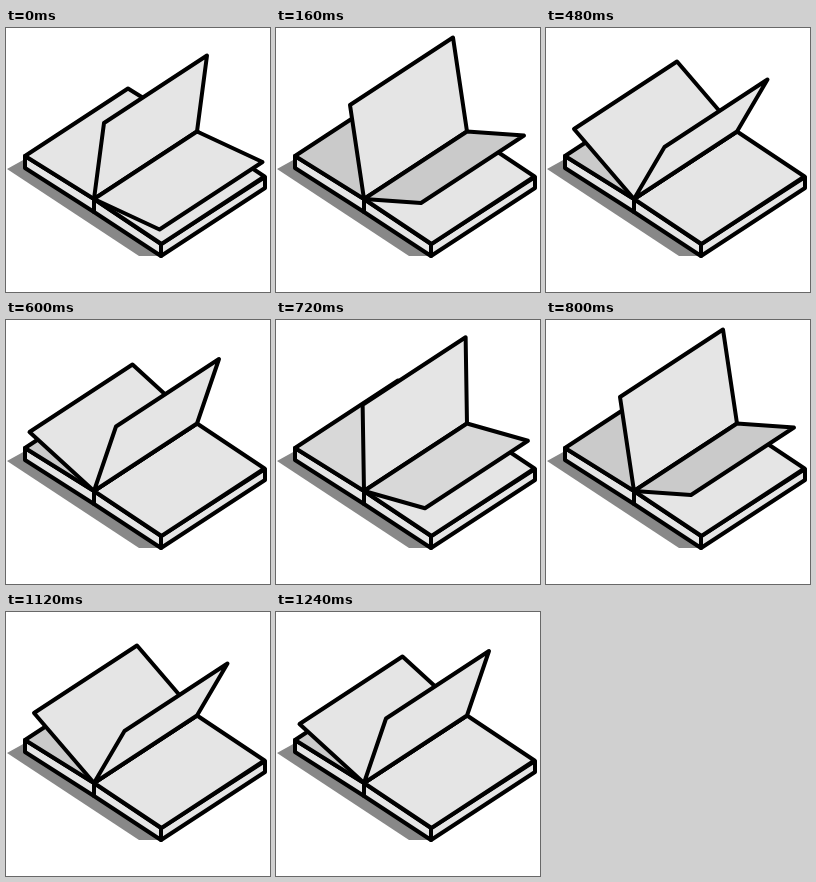
Write an HTML page with a canvas that moves like this. It is 264x264 px and loops after 1280 ms.

```html
<!DOCTYPE html>
<html lang="en">
<head>
<meta charset="utf-8">
<title>Turning pages</title>
<style>
  html, body { margin: 0; height: 100%; overflow: hidden; background: #fff; }
  canvas { display: block; width: 264px; height: 264px; }
</style>
</head>
<body>
<canvas id="stage" width="264" height="264"></canvas>
<script>
const ctx = document.getElementById('stage').getContext('2d');
const STEP = 40, STEPS = 16;
const LIGHT = 229, DARK = 202;
const spine = [88, 171], depth = [103, -67.5];

// Offset of a page's outer edge from the spine, at these steps of a turn
const keys = [0, 4, 8, 12, 15];
const rising = { x: [65.5, 57, 46, 30.5, 22], y: [30.5, 4, -24.5, -52, -64.5] };
const falling = { x: [10, -14, -40, -60, -64.5], y: [-76, -94, -92, -70, -59] };

// Smooth curve through the key values (Lagrange)
const curve = (values, t) => values.reduce((sum, v, i) =>
  sum + keys.reduce((w, k, j) => j === i ? w : w * (t - k) / (keys[i] - k), v), 0);

const gray = v => `rgb(${v},${v},${v})`;

function polygon(points, fill, outlined = true) {
  ctx.beginPath();
  points.forEach(p => ctx.lineTo(...p));
  ctx.closePath();
  ctx.fillStyle = fill;
  ctx.fill();
  if (outlined) ctx.stroke();
}

function leaf(dx, dy, fill) {
  const [x, y] = spine, [ex, ey] = depth;
  polygon([[x, y], [x + dx, y + dy], [x + dx + ex, y + dy + ey], [x + ex, y + ey]], fill);
}

function book(leftFill) {
  polygon([[1, 141], [19, 131], [155, 228], [133, 228]], '#888', false);
  polygon([[19, 128], [88, 171], [88, 184], [19, 140]], gray(LIGHT));
  polygon([[88, 171], [155, 216], [155, 228], [88, 184]], gray(LIGHT));
  polygon([[155, 216], [259, 149], [259, 160], [155, 228]], gray(LIGHT));
  leaf(-69, -43, leftFill);
  leaf(67.5, 45, gray(LIGHT));
}

function draw(now) {
  const t = Math.floor(now / STEP) % STEPS;
  const shaded = gray(Math.round(LIGHT + (DARK - LIGHT) * Math.min(1, t / 4)));
  const pose = path => [curve(path.x, t), curve(path.y, t)];

  ctx.clearRect(0, 0, 264, 264);
  ctx.lineWidth = 4;
  ctx.lineJoin = 'round';
  book(shaded);
  leaf(...pose(falling), gray(LIGHT));
  leaf(...pose(rising), t <= 8 ? shaded : gray(LIGHT));
  requestAnimationFrame(draw);
}
requestAnimationFrame(draw);
</script>
</body>
</html>
```
